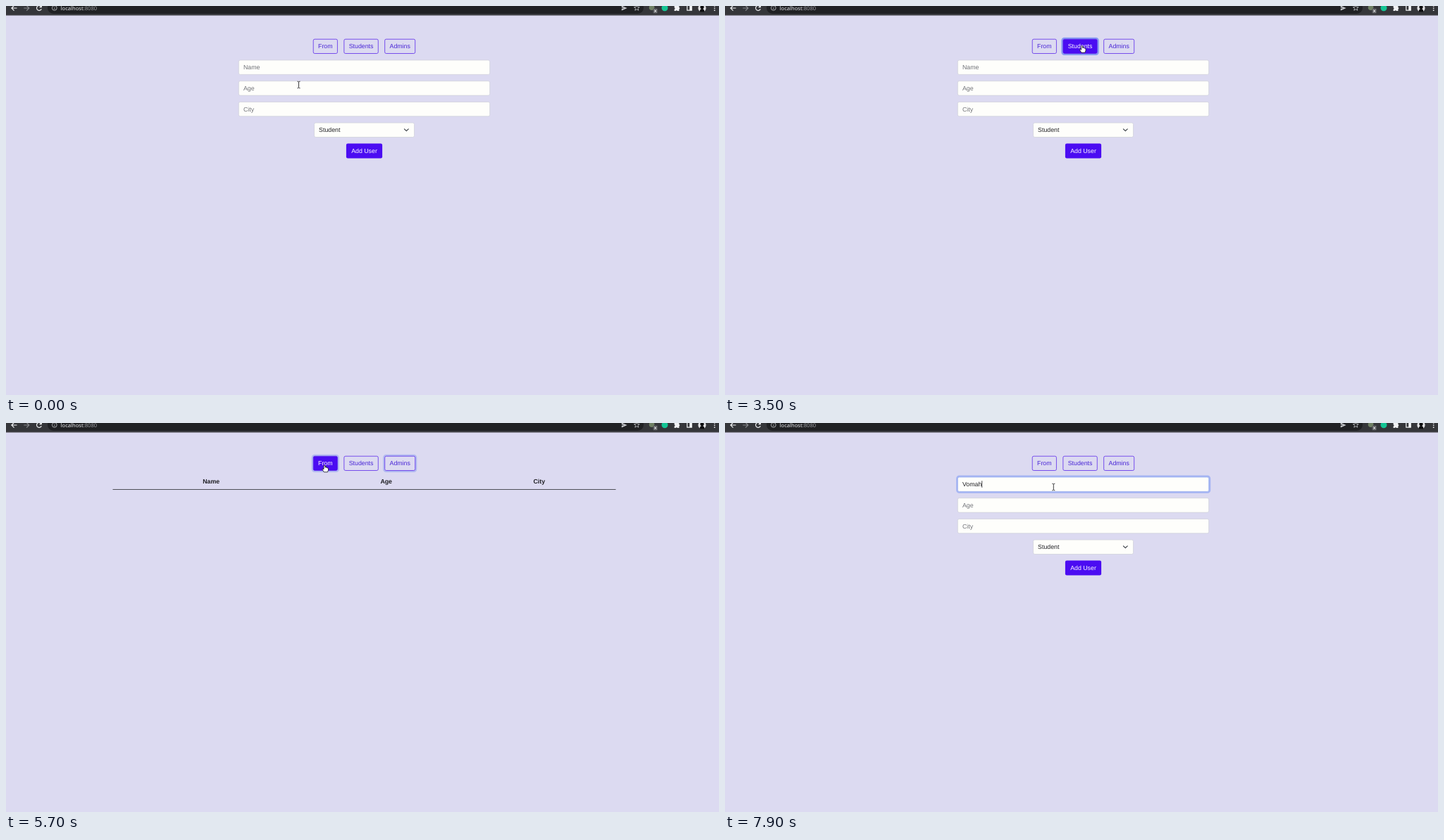
These frames come from a looping animation (1012x553 px, 8000 ms). An HTML page:

```html
<!DOCTYPE html>
<html lang="en">
<head>
<meta charset="utf-8">
<title>User form</title>
<style>
  html, body { margin: 0; width: 100%; height: 100%; overflow: hidden; background: #dcdaf1; }
  svg { display: block; width: 100%; height: 100%; }
  text { font: 8.8px "Liberation Sans", Arial, sans-serif; text-rendering: geometricPrecision; white-space: pre; }
  .mid { text-anchor: middle; }
  .head { font-weight: bold; fill: #212126; }
  .url { font: 7.6px "Noto Sans", "Open Sans", sans-serif; fill: #e6e7ea; }
  .hint { fill: #707278; }
  .ink { fill: #212126; }
</style>
</head>
<body>
<svg viewBox="0 0 1012 553">
  <rect width="1012" height="553" fill="#dcdaf1"/>

  <g id="bar">
    <rect width="1012" height="13.3" fill="#35363a"/>
    <rect y="12.6" width="1012" height=".7" fill="#55565b"/>
    <rect x="59" y="-6" width="846" height="17" rx="8.5" fill="#202124"/>
    <g fill="none" stroke="#f1f2f4" stroke-width="1.2">
      <path d="M15.5 3H8M11.5-.6L7.9 3L11.5 6.6"/>
      <path d="M25.3 3H32.6M29.2-.6L32.8 3L29.2 6.6" stroke="#85868a"/>
      <path d="M50 1A3.5 3.5 0 1 0 50.3 4.2M50.3-1V1.6H47.6"/>
      <g stroke="#c6c8cc" stroke-width=".8">
        <circle cx="68.8" cy="2.8" r="3.4"/>
        <path d="M68.8 2.5V4.7M68.8 .7V1.5"/>
        <path d="M895.3-1.2L896.4 1.4L899.2 1.6L897 3.4L897.8 6.2L895.3 4.7L892.8 6.2L893.6 3.4L891.4 1.6L894.2 1.4Z"/>
      </g>
      <path d="M966.8-.6H973.2V6.2H966.8Z"/>
    </g>
    <text class="url" x="77.6" y="5.6">localhost<tspan fill="#9a9ca1">:8080</tspan></text>
    <path d="M873.8-.4L881.6 3L873.8 6.4V3.8L878 3L873.8 2.2Z" fill="#c6c8cc"/>
    <circle cx="916.6" cy="2.2" r="3.8" fill="#6f8064"/>
    <rect x="918.5" y="3.4" width="6.2" height="7" rx="1.2" fill="#5c5d61"/>
    <path d="M920.3 5.3L923 8.9M923 5.3L920.3 8.9" stroke="#fff" stroke-width=".9"/>
    <circle cx="935" cy="2.8" r="4.5" fill="#14c594"/>
    <path d="M948.6 0H950.8A1.4 1.4 0 0 1 953.4 0H955.4V2A1.4 1.4 0 0 1 955.4 4.6V7H953A1.3 1.3 0 0 0 950.6 7H948.6V4.8A1.3 1.3 0 0 0 948.6 2.3Z" fill="#f1f2f4"/>
    <rect x="970.2" y="-.6" width="3.2" height="6.8" fill="#f1f2f4"/>
    <circle cx="988" cy="3" r="5.6" fill="#e2e2e4"/>
    <path d="M984.6 8.2Q985 4 988 4Q991 4 991.4 8.2Q988 9.4 984.6 8.2Z" fill="#0c0c0e"/>
    <circle cx="988" cy="1.6" r="2.6" fill="#0c0c0e"/>
    <path d="M1005.7 0V6.4" stroke="#e6e7ea" stroke-width="1.8" stroke-linecap="round" stroke-dasharray="0 3.1"/>
  </g>

  <g id="tabs"></g>

  <g id="form">
    <rect id="glow" x="329.3" y="75.7" width="358.8" height="22.9" rx="3.2" fill="none" stroke="#a4b4f3" stroke-width="2.3"/>
    <g id="fields"></g>
    <rect id="caret" y="82.2" width=".8" height="9.6" fill="#212126"/>
    <path d="M565.4 174.8L568.3 177.7L571.2 174.8" fill="none" stroke="#343a40" stroke-width="1.1" stroke-linecap="round" stroke-linejoin="round"/>
    <rect x="482.9" y="195.6" width="51.2" height="20.9" rx="2.2" fill="#4b0cf2"/>
    <text class="mid" x="508.5" y="209" fill="#fff">Add User</text>
  </g>

  <g id="table">
    <text class="mid head" x="291.2" y="86.1">Name</text>
    <text class="mid head" x="539.7" y="86.1">Age</text>
    <text class="mid head" x="756.8" y="86.1">City</text>
    <rect x="151.5" y="94.1" width="714" height=".75" fill="#212126"/>
  </g>

  <g id="pointer">
    <path id="hand" d="M-1 .8Q0-.6 1 .8V3.5Q2-.0 2.7 3.6Q3.9 3 4.2 4.2Q5.5 3.8 5.5 5.2V7.2L4.4 10H-.6L-3 6.3Q-3.3 4.8-1.8 5.4L-1 6.2Z" fill="#fff" stroke="#17171a" stroke-width=".8" stroke-linejoin="round"/>
    <path id="beam" d="M-2-4.8Q-.2-4.8 0-4Q.2-4.8 2-4.8M0-4V4M-2 4.8Q-.2 4.8 0 4Q.2 4.8 2 4.8" fill="none" stroke="#26262a" stroke-width=".9"/>
    <path id="arrow" d="M0 0V9L2.1 7.1L3.5 10.2L4.9 9.6L3.5 6.6H6.3Z" fill="#17171a" stroke="#fff" stroke-width=".7"/>
  </g>
</svg>
<script>
const LOOP = 8000, TICK = 100, TYPED = "Vomah", TYPING = 7500;
const REM = 8.8, MIDDLE = 508.5, PITCH = 29.7, TAB_Y = 46.9, TAB_H = 20.9, FIELD_H = 20.4;
const $ = id => document.getElementById(id);

function add(parent, tag, attrs, text) {
  const el = document.createElementNS("http://www.w3.org/2000/svg", tag);
  for (const k in attrs) el.setAttribute(k, attrs[k]);
  if (text) el.textContent = text;
  return parent.appendChild(el);
}

const mix = (a, b, p) => a.map((v, i) => v + (b[i] - v) * p);
const rgb = c => `rgb(${c.map(Math.round)})`;
const PAGE = [220, 218, 241], HALF = [110, 118, 244], FULL = [75, 12, 242];
const LABEL = [72, 36, 214], WHITE = [255, 255, 255];
const tint = p => p < .5 ? mix(PAGE, HALF, p * 2) : mix(HALF, FULL, p * 2 - 1);

// each tab is as wide as its label plus padding
let left = 435.9;
const tabs = ["From", "Students", "Admins"].map(name => {
  const glow = add($("tabs"), "rect", { y: TAB_Y - 1.1, height: TAB_H + 2.2, rx: 3.2,
    fill: "none", stroke: "#8799f2", "stroke-width": 2.2 });
  const box = add($("tabs"), "rect", { y: TAB_Y + .3, height: TAB_H - .6, rx: 2,
    stroke: "#4b12ea", "stroke-width": .7 });
  const text = add($("tabs"), "text", { class: "mid", y: 60.1 }, name);
  const x = left, w = text.getComputedTextLength() + 1.625 * REM;
  glow.setAttribute("x", x - 1.1);
  glow.setAttribute("width", w + 2.2);
  box.setAttribute("x", x + .3);
  box.setAttribute("width", w - .6);
  text.setAttribute("x", x + w / 2);
  left += w + REM;
  return { name, x, w, glow, box, text };
});

const fields = ["Name", "Age", "City", "Student"].map((name, i) => {
  const w = name === "Student" ? 142 : 356.4, x = MIDDLE - w / 2, y = 77 + i * PITCH;
  const box = add($("fields"), "rect", { x, y, width: w, height: FIELD_H, rx: 2.2,
    fill: "#fefefb", stroke: "#cdced8", "stroke-width": .7 });
  const text = add($("fields"), "text", { class: i < 3 ? "hint" : "ink", x: x + 6.6, y: y + 13.1 }, name);
  return { x, y, w, box, text };
});

// pointer moves: start, end, x, y
const moves = [
  [1100, 1600, 437.5, 59.5], [1900, 2000, 443.7, 54.3], [2700, 3100, 493.8, 61.3],
  [3200, 3500, 506.5, 56.2], [4400, 4700, 556, 56.5], [5000, 5400, 452, 59.8],
  [6170, 6300, 461.4, 77.6], [6300, 6600, 466.3, 91]
];
const clicks = [
  { at: 2400, up: 2500, on: "From" }, { at: 3400, up: 4000, on: "Students" },
  { at: 4600, up: 4800, on: "Admins" }, { at: 5700, up: 5800, on: "From" },
  { at: 6600, up: 6700, on: "Name" }
];

function pointAt(t) {
  let p = [415.5, 112];
  for (const [from, to, x, y] of moves) {
    if (t > from) p = mix(p, [x, y], Math.sin(Math.min(1, (t - from) / (to - from)) * Math.PI / 2));
  }
  return p;
}

const inside = ([x, y], r, top, h) => x >= r.x && x <= r.x + r.w && y >= top && y <= top + h;
const hovers = (tab, t) => inside(pointAt(t), tab, TAB_Y, TAB_H);
const focused = t => clicks.filter(c => t >= c.at).pop()?.on;

function tableOpen(t) {
  const last = clicks.filter(c => t >= c.up && c.on !== "Name").pop();
  return !!last && last.on !== "From";
}

// a state change takes two ticks to show fully
const fade = (test, t) => (test(t) + test(t - TICK)) / 2;

const show = (id, on) => $(id).setAttribute("visibility", on ? "inherit" : "hidden");

function drawTabs(t) {
  for (const tab of tabs) {
    const p = fade(u => hovers(tab, u), t);
    tab.box.setAttribute("fill", rgb(tint(p)));
    tab.text.setAttribute("fill", rgb(mix(LABEL, WHITE, p)));
    tab.glow.setAttribute("opacity", fade(u => focused(u) === tab.name, t));
  }
}

function drawForm(t) {
  const { box, text } = fields[0];
  const focus = fade(u => focused(u) === "Name", t);
  $("glow").setAttribute("opacity", focus);
  box.setAttribute("stroke", rgb(mix([205, 206, 216], [142, 166, 240], focus)));

  const count = Math.max(0, Math.floor((t - TYPING) / TICK) + 1);
  text.textContent = count ? TYPED.slice(0, count) : "Name";
  text.setAttribute("class", count ? "ink" : "hint");
  $("caret").setAttribute("x", 337 + (count ? text.getComputedTextLength() : 0));
  const blink = Math.floor((t - 6700) / 500) % 2 === 0;
  show("caret", count || (focus === 1 && blink));
}

function drawPointer(t) {
  const p = pointAt(t), table = tableOpen(t);
  const swapping = table !== tableOpen(t - TICK);
  const hand = !swapping && tabs.some(tab => hovers(tab, t));
  const beam = !swapping && !table && fields.some(f => inside(p, f, f.y, FIELD_H));
  $("pointer").setAttribute("transform", `translate(${p})`);
  show("hand", hand);
  show("beam", beam);
  show("arrow", !hand && !beam);
}

function draw(time) {
  const t = Math.floor(time / TICK) * TICK;
  show("form", !tableOpen(t));
  show("table", tableOpen(t));
  drawTabs(t);
  drawForm(t);
  drawPointer(t);
}

const start = performance.now();
function frame() {
  draw((performance.now() - start) % LOOP);
  requestAnimationFrame(frame);
}
frame();
</script>
</body>
</html>
```
